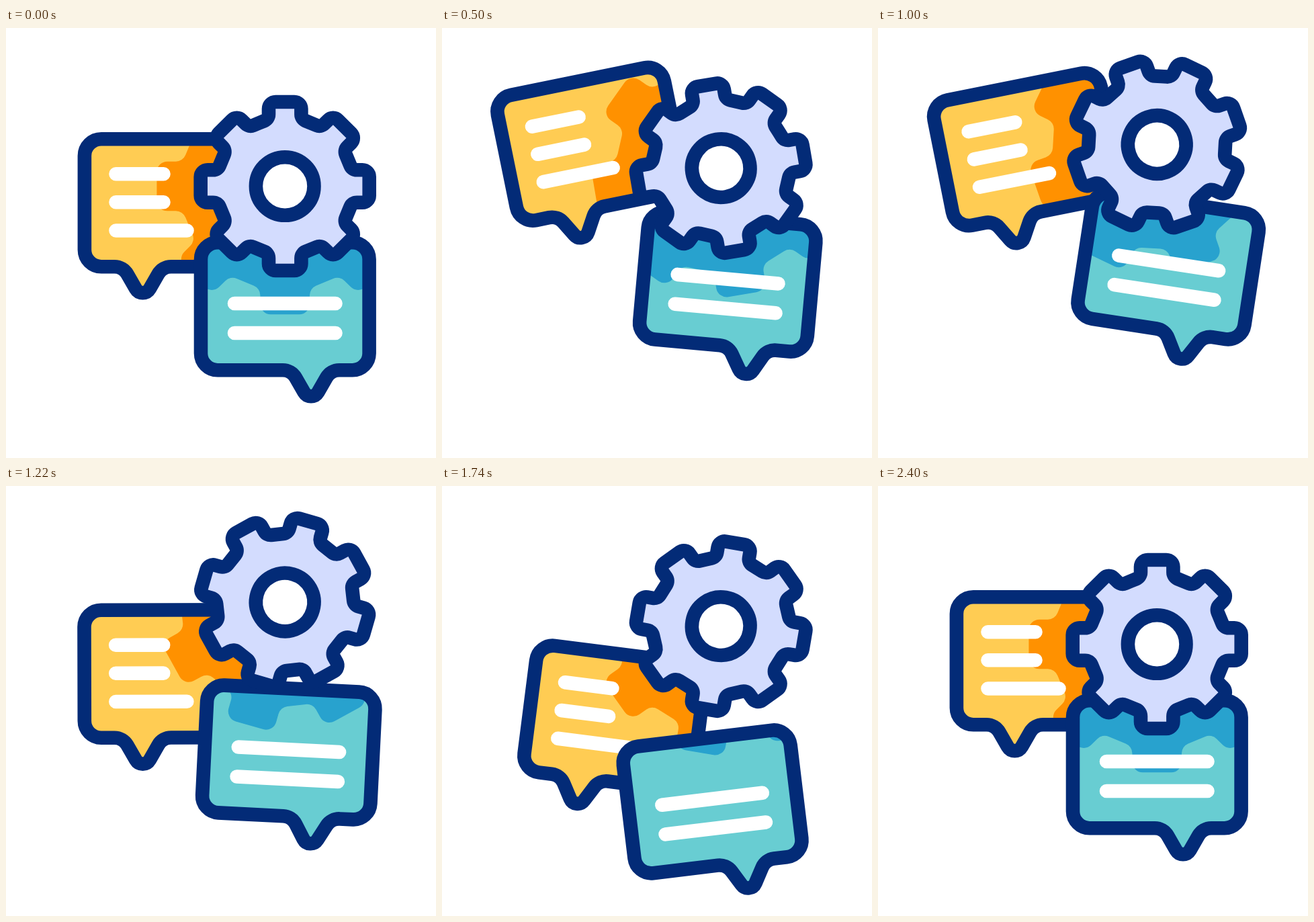
These frames come from a looping animation (640 px wide and 640 px high, 2.42 s). An HTML page with a canvas:

```html
<!DOCTYPE html>
<html lang="en">
<head>
<meta charset="utf-8">
<title>Chat settings</title>
<style>
  html, body { margin: 0; width: 100%; height: 100%; overflow: hidden; background: #fff; }
  canvas { display: block; width: 640px; height: 640px; }
</style>
</head>
<body>
<canvas id="stage" width="640" height="640"></canvas>
<script>
const ctx = document.getElementById('stage').getContext('2d');
const LOOP = 2420;
const STEP = 20;
const STROKE = 20.6;
const NAVY = '#032b77';
const SHADOW_SCALE = 1.52;

// Each key is [time, dy, degrees].
const bubbles = [
  {
    left: 116.9, top: 165.2, width: 253, tailX: 203.5, fill: '#ffcc53', shade: '#ff9100',
    lines: [[163.5, 234.5, 217.3], [163.5, 234.5, 259.3], [163.5, 269.5, 301.5]],
    keys: [[33, 0, 0], [767, -112.8, -15.9], [1533, 89.3, 8.2], [2400, 0, 0]]
  },
  {
    left: 290, top: 319.2, width: 250.6, tailX: 454, fill: '#68cdd2', shade: '#28a2ce',
    lines: [[340, 490.5, 410], [340, 490.5, 454]],
    keys: [[100, 0, 0], [867, -62, 9.6], [1660, 51.5, -7], [2400, 0, 0]]
  }
];

const gear = { x: 415.2, y: 235.5, lift: 64, duration: 2240 };

const rad = deg => deg * Math.PI / 180;
const clamp01 = v => Math.min(1, Math.max(0, v));
const smooth = v => v * v * (3 - 2 * v);

// cubic-bezier(.42, 0, .58, 1)
function easeInOut(x) {
  let lo = 0, hi = 1;
  for (let i = 0; i < 24; i++) {
    const u = (lo + hi) / 2;
    const bx = 3 * u * (1 - u) * (0.42 * (1 - u) + 0.58 * u) + u ** 3;
    if (bx < x) lo = u; else hi = u;
  }
  return smooth((lo + hi) / 2);
}

function poseAt(keys, t) {
  let i = 0;
  while (i < keys.length - 2 && t >= keys[i + 1][0]) i++;
  const [a, b] = [keys[i], keys[i + 1]];
  const k = easeInOut(clamp01((t - a[0]) / (b[0] - a[0])));
  return { dy: a[1] + (b[1] - a[1]) * k, angle: rad(a[2] + (b[2] - a[2]) * k) };
}

// Closed polygon from [x, y, cornerRadius] points.
function roundedPolygon(points) {
  const path = new Path2D();
  const last = points[points.length - 1];
  path.moveTo((last[0] + points[0][0]) / 2, (last[1] + points[0][1]) / 2);
  points.forEach(([x, y, r], i) => {
    const next = points[(i + 1) % points.length];
    path.arcTo(x, y, next[0], next[1], r);
  });
  path.closePath();
  return path;
}

function bubblePath({ left, top, width, tailX }) {
  const right = left + width, bottom = top + 190;
  return roundedPolygon([
    [left, top, 25], [right, top, 25], [right, bottom, 25],
    [tailX + 29.4, bottom, 22], [tailX, bottom + 51, 12], [tailX - 29.4, bottom, 22],
    [left, bottom, 25]
  ]);
}

function gearPath() {
  const tip = 125.5, root = 100, half = 24.2, corner = 10.3;
  const points = [];
  for (let i = 0; i < 8; i++) {
    const c = Math.cos(rad(i * 45)), s = Math.sin(rad(i * 45));
    const add = (r, side) =>
      points.push([r * s + side * c, -r * c + side * s, corner]);
    add(root, -half);
    add(tip, -half);
    add(tip, half);
    add(root, half);
  }
  return roundedPolygon(points);
}

const gearShape = gearPath();
bubbles.forEach(b => { b.shape = bubblePath(b); });

function gearPose(t) {
  const p = clamp01(t / gear.duration);
  return {
    y: gear.y - gear.lift * smooth(1 - Math.abs(2 * p - 1)),
    angle: p * 2 * Math.PI
  };
}

function placeGear(pose, scale) {
  ctx.translate(gear.x, pose.y);
  ctx.rotate(pose.angle);
  ctx.scale(scale, scale);
}

function outline(shape) {
  ctx.strokeStyle = NAVY;
  ctx.lineWidth = STROKE;
  ctx.stroke(shape);
}

function drawBubble(bubble, t, cog) {
  const { dy, angle } = poseAt(bubble.keys, t);
  const pivotY = bubble.top + 204;
  const place = () => {
    ctx.translate(bubble.tailX, pivotY + dy);
    ctx.rotate(angle);
    ctx.translate(-bubble.tailX, -pivotY);
  };

  ctx.save();
  place();
  ctx.fillStyle = bubble.fill;
  ctx.fill(bubble.shape);
  ctx.clip(bubble.shape);
  ctx.setTransform(1, 0, 0, 1, 0, 0);
  placeGear(cog, SHADOW_SCALE);
  ctx.fillStyle = bubble.shade;
  ctx.fill(gearShape);
  ctx.restore();

  ctx.save();
  place();
  outline(bubble.shape);
  ctx.strokeStyle = '#fff';
  ctx.lineCap = 'round';
  ctx.beginPath();
  for (const [x1, x2, y] of bubble.lines) {
    ctx.moveTo(x1, y);
    ctx.lineTo(x2, y);
  }
  ctx.stroke();
  ctx.restore();
}

function drawGear(pose) {
  const hub = new Path2D();
  hub.arc(0, 0, 43.3, 0, 2 * Math.PI);
  ctx.save();
  placeGear(pose, 1);
  ctx.fillStyle = '#d3dcfe';
  ctx.fill(gearShape);
  outline(gearShape);
  ctx.fillStyle = '#fff';
  ctx.fill(hub);
  outline(hub);
  ctx.restore();
}

function render(t) {
  const cog = gearPose(t);
  ctx.fillStyle = '#fff';
  ctx.fillRect(0, 0, 640, 640);
  bubbles.forEach(b => drawBubble(b, t, cog));
  drawGear(cog);
}

const start = performance.now();
function tick() {
  const t = (performance.now() - start) % LOOP;
  render(Math.floor(t / STEP) * STEP);
  requestAnimationFrame(tick);
}
tick();
</script>
</body>
</html>
```
